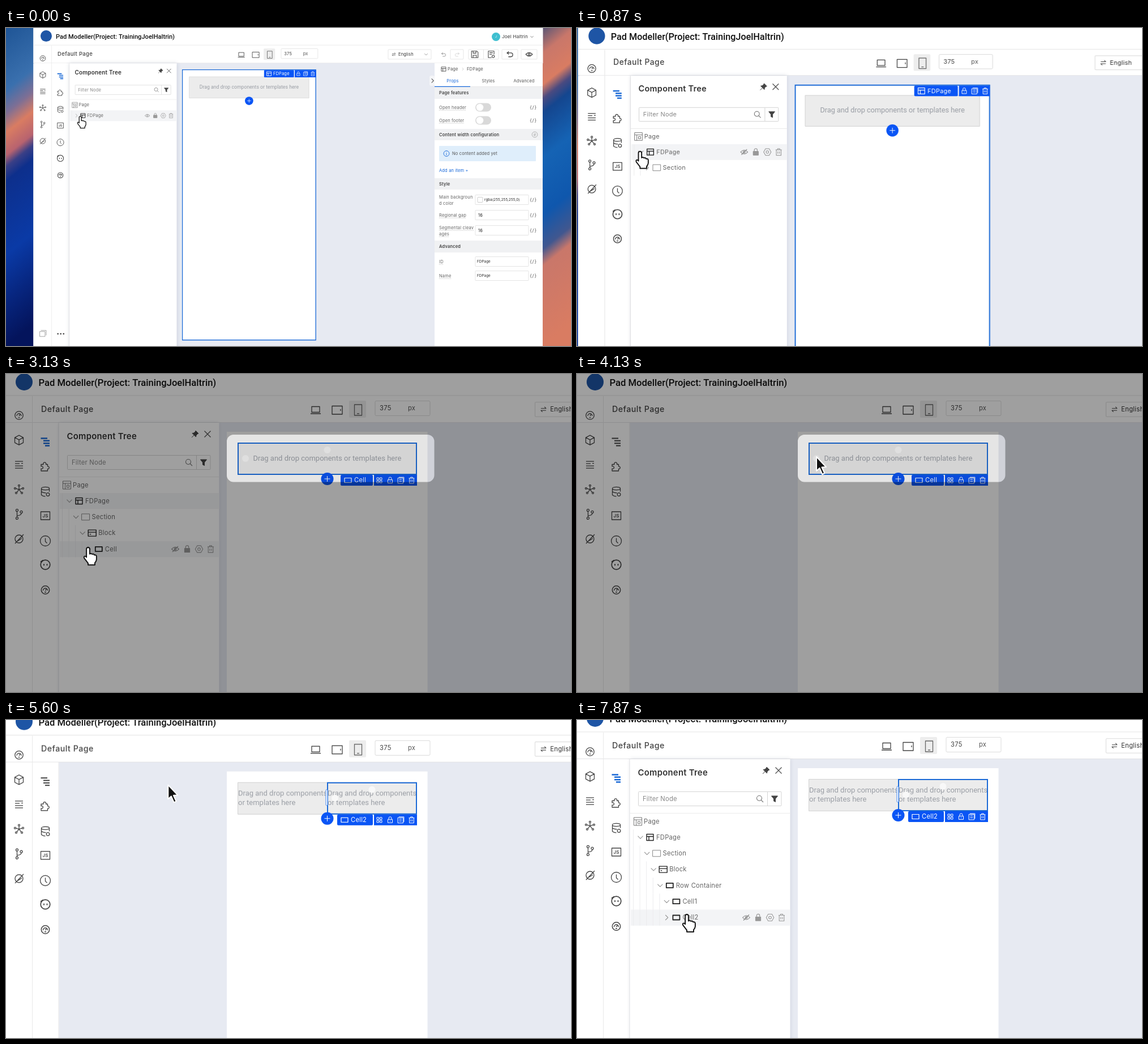
Animation of 998 by 561 pixels, one loop 7.94 s. Source, as an HTML page with a canvas:

```html
<!DOCTYPE html>
<html>
<head>
<meta charset="utf-8">
<style>
html, body { margin: 0; width: 100%; height: 100%; overflow: hidden; background: #fff; }
canvas { display: block; }
</style>
</head>
<body>
<canvas id="stage" width="998" height="561"></canvas>
<script>
const W = 998, H = 561, LOOP = 7940, ZOOM = 1.494;
const BLUE = '#0a55f5', FRAME = '#1b6ad6', INK = '#444', GREY = '#777';
const out = document.getElementById('stage').getContext('2d');
const buffer = document.createElement('canvas');
buffer.width = W;
buffer.height = H;
const g = buffer.getContext('2d');

const clamp = v => Math.max(0, Math.min(1, v));
const smooth = v => (v = clamp(v), v * v * (3 - 2 * v));
const spring = (ms, rate) => {
  const a = Math.max(0, ms) * rate / 1000;
  return 1 - (1 + a) * Math.exp(-a);
};

// Icons are drawn around their own centre.
const ring = (x, y, r) => `M${x + r} ${y}a${r} ${r} 0 1 0 ${-2 * r} 0a${r} ${r} 0 1 0 ${2 * r} 0`;
const ICONS = {
  gauge: ring(0, 0, 7.2) + 'M-4 1A4 4 0 0 1 4 1M0 1L2-1.5M-1.5 3.8H1.5',
  cube: 'M0-8.5L7.5-4.5V4.5L0 8.5L-7.5 4.5V-4.5ZM-7.5-4.5L0-.5L7.5-4.5M0-.5V8.5',
  list: 'M-7-6H7M-7-2H1M-7 2H7M-7 6H7M4-2.5H7',
  nodes: 'M0 0V-6M0 0L6-2M0 0L4 5M0 0L-4 5M0 0L-6-2' + ring(0, -7, 1.5) + ring(7, -2, 1.5) + ring(5, 6, 1.5) + ring(-5, 6, 1.5) + ring(-7, -2, 1.5),
  branch: ring(-3.5, -7, 2) + ring(4, -4, 2) + ring(-3.5, 7, 2) + 'M-3.5-5V5M4-2Q4 2-3.5 2.5',
  brush: ring(0, 0, 7) + 'M-7 8L8-8M-3 4L5-1',
  tree: 'M-7.5-6H4M-3-1.7H8M-3 2.7H8M0 7H8',
  puzzle: 'M-7-3.5H-3a2.5 2.5 0 1 1 4.5 0H4.5V0a2.3 2.3 0 1 1 0 4.5V8H-7V4a2.3 2.3 0 1 0 0-4Z',
  data: 'M-7-5.5a7 2.6 0 1 0 14 0a7 2.6 0 1 0-14 0V6q3 2.4 7 2.4M7-5.5V0M-7 0q3 2.5 8 2.2' + ring(4.5, 5, 2.8),
  script: 'M-8-7H8V7H-8Z',
  clock: ring(0, 0, 9) + 'M0-5V1L3 4',
  face: ring(0, 0, 8.3) + 'M-2.5-1.5V1.5M3-1.5V1.5M-8.5-5L-4-8',
  eye: 'M-6.5 0Q0-7 6.5 0Q0 7-6.5 0Z' + ring(0, 0, 1.8),
  slash: 'M-5 5L5-5',
  lock: 'M-4.5-1H4.5V5.5H-4.5ZM-2.7-1V-3.5a2.7 2.7 0 0 1 5.4 0V-1M0 1.5V3',
  lockBody: 'M-4.5-1H4.5V5.5H-4.5Z',
  hex: 'M-3.3-6H3.3L6.7 0L3.3 6H-3.3L-6.7 0Z' + ring(0, 0, 2.3),
  trash: 'M-5.5-4H5.5M-2-4V-6H2V-4M-4.3-4V6H4.3V-4M-1.5-1V3M1.5-1V3',
  copy: 'M-4-6H6V4M-6-4.5H4.5V6H-6ZM-3.5-1.5H2M-3.5 2H2',
  grid: 'M-5-5H-1V-1H-5ZM1-5H5V-1H1ZM-5 1H-1V5H-5ZM1 1H5V5H1Z',
  Page: 'M-7-7H7V7H-7ZM-7-3H7M-3-3V7M0 0H4V4H0Z',
  FDPage: 'M-6-5.5H6V5.5H-6ZM-6-1.5H6M-2-1.5V5.5',
  Section: 'M-7-5.5H7V5.5H-7Z',
  Block: 'M-7-5.5H7V5.5H-7ZM-7-1.5H7M-4.5 2H-2',
  Cell: 'M-6-4H6V4H-6Z',
  down: 'M-4.5-2.3L0 2.3L4.5-2.3',
  right: 'M-2.3-4.5L2.3 0L-2.3 4.5',
  pin: 'M1-6L6-1L4.5-.5L2 2L1.5 5L-5-1.5L-2-2L.5-4.5ZM-2 2L-6 6',
  close: 'M-5.5-5.5L5.5 5.5M5.5-5.5L-5.5 5.5',
  search: ring(-1, -1, 4.5) + 'M2.5 2.5L6 6',
  funnel: 'M-5.5-5H5.5L1.5 0V5.5L-1.5 4V0Z',
  laptop: 'M-7-6H7V4H-7ZM-9 6.5H9',
  tablet: 'M-9-7H9V7.5H-9ZM6-1.5V1.5',
  phone: 'M-6.5-9.5H6.5V9.5H-6.5ZM-2 6.5H2',
  swap: 'M-5-2H5L2-5M5 2H-5L-2 5',
  undo: 'M-2-6L-6-3L-2 0M-6-3H2a4 4 0 0 1 0 8H-3',
  redo: 'M2-6L6-3L2 0M6-3H-2a4 4 0 0 0 0 8H3',
  save: 'M-8-8H5L8-5V8H-8ZM-4-8V-3H3V-8M-4 8V2H4V8',
  note: 'M1 8H-7V-8H7V0M-4-4H4M-4 0H2' + ring(5, 5, 3),
  info: ring(0, 0, 7) + 'M0-1V4M0-4V-3',
  stack: 'M-5-8H9V5M-8-5H6V8H-8Z',
  plus: 'M-5 0H5M0-5V5',
  hand: 'M-3 3Q-3 0 0 0Q3 0 3 3V12Q5.5 10 7.5 12.5Q10 11 11.5 14Q15.5 13 15.5 17V22Q15 26 12.5 28V32H0V29Q-3 25-7 20Q-8.5 16-5.5 16Q-4.5 16-3 18Z',
  arrow: 'M0 0V25L5.5 20L10.3 31L14.3 29L9.5 18.5L17 18Z'
};
for (const k in ICONS) ICONS[k] = new Path2D(ICONS[k]);

function icon(name, x, y, color = INK, width = 1.3, scale = 1, fill) {
  g.save();
  g.translate(x, y);
  g.scale(scale, scale);
  g.lineWidth = width;
  g.lineJoin = 'round';
  if (fill) { g.fillStyle = fill; g.fill(ICONS[name]); }
  g.strokeStyle = color;
  g.stroke(ICONS[name]);
  g.restore();
}

function text(s, x, y, color = '#666', size = 11.2, weight = 400, gap = .25, font = 'Inter', align = 'left') {
  g.font = `${weight} ${size}px ${font}, sans-serif`;
  g.letterSpacing = gap + 'px';
  g.textAlign = align;
  g.textBaseline = 'middle';
  g.fillStyle = color;
  g.fillText(s, x, y + .4);
}
const small = (s, x, y, color = '#555', weight = 400, align) => text(s, x, y, color, 7.5, weight, .17, 'Inter', align);
const braces = y => text('{/}', 931.5, y, '#555', 8.2, 400, .8, 'Inter', 'center');

function rect(x, y, w, h, fill, stroke, r = 0, line = 1) {
  g.beginPath();
  g.roundRect(x, y, w, h, r);
  if (fill) { g.fillStyle = fill; g.fill(); }
  if (stroke) { g.strokeStyle = stroke; g.lineWidth = line; g.stroke(); }
}
const dot = (x, y, r, color) => rect(x - r, y - r, 2 * r, 2 * r, color, null, r);

// Slanted bands; the stops are heights on the left edge of the strip.
function wallpaper(x, slope, stops) {
  const d = H / (1 + slope * slope);
  const fill = g.createLinearGradient(x, 0, x - slope * d, d);
  stops.forEach(([y, c]) => fill.addColorStop(y / H, c));
  rect(x, 0, 50, H, fill);
}

function field(y, value, size = 7.5) {
  rect(829, y - 8.5, 94, 17, '#fff', '#d9d9d9', 1, .7);
  text(value, value[0] === 'r' ? 845 : value[0] === 'F' ? 832 : 834, y, '#222', size, 400, .15);
  braces(y);
}

function label(s, x, y, dashed = true) {
  small(s, x, y, '#666');
  if (!dashed) return;
  const w = g.measureText(s).width;
  g.setLineDash([1, 1]);
  g.lineWidth = .6;
  g.strokeStyle = '#888';
  g.beginPath();
  g.moveTo(x, y + 5);
  g.lineTo(x + w, y + 5);
  g.stroke();
  g.setLineDash([]);
}

function band(y, h, s) {
  rect(757, y, 191, h, '#f0f1f3');
  small(s, 765, y + h / 2, '#444', 600);
}

function propsPanel() {
  rect(757, 62, 191, 560, '#fff');
  rect(748, 84, 9, 18, '#f4f5f8', null, 3);
  icon('right', 753.5, 93, '#666', 1.4, .8);
  icon('FDPage', 773, 72.5, INK, 1.3, .67);
  small('Page', 780, 72.5);
  icon('right', 807, 72.5, '#aaa', 1.2, .5);
  small('FDPage', 814, 72.5);
  small('Props', 789, 93.5, '#1667d9', 400, 'center');
  small('Styles', 852, 93.5, '#555', 400, 'center');
  small('Advanced', 915, 93.5, '#555', 400, 'center');
  band(104, 21, 'Page features');
  rect(757, 103, 191, .8, '#e0e0e0');
  rect(757, 102.7, 63, 1.3, '#1667d9');
  [['Open header', 140], ['Open footer', 163]].forEach(([s, y]) => {
    label(s, 765, y);
    rect(829, y - 7.5, 28, 15, '#d9d9d9', null, 7.5);
    dot(837, y, 6.3, '#fff');
    braces(y);
  });
  band(178, 20, 'Content width configuration');
  icon('info', 934, 188, '#999', 1, .7);
  icon('swap', 934, 188, '#999', 1, .45);
  rect(765, 208, 171, 27, '#dfeefb', null, 1);
  icon('info', 778, 221.5, '#1667d9', 1.3, .7);
  small('No content added yet', 788, 221.5);
  small('Add an item +', 765, 251, '#1667d9');
  band(265, 20, 'Style');
  label('Main backgroun', 765, 298, false);
  label('d color', 765, 309, false);
  field(303, 'rgba(255,255,255,0)', 6.2);
  rect(833, 298.5, 9, 9, '#fff', '#bbb', 1, .7);
  label('Regional gap', 765, 330);
  field(330, '16');
  label('Segmental cleav', 765, 352);
  label('ages', 765, 363);
  field(357, '16');
  band(375, 21, 'Advanced');
  label('ID', 765, 412);
  field(412, 'FDPage', 6.2);
  label('Name', 765, 437);
  field(437, 'FDPage', 6.2);
}

function topRight() {
  dot(865.5, 15.5, 7.5, '#3fbfd0');
  text('J', 865.5, 15.5, '#fff', 5, 400, 0, 'Inter', 'center');
  text('Joel Haltrin', 876, 15.5, '#333', 8.1, 400, .2);
  icon('down', 929, 15.5, '#555', 1.3, .55);
  [[675, 76], [785, 23], [817, 53], [876, 28], [910, 28]].forEach(([x, w]) => rect(x, 38, w, 17, '#fff', '#dcdcdc', 1, .7));
  rect(843, 38, .7, 17, '#dcdcdc');
  icon('swap', 685, 46.5, INK, 1.2, .6);
  small('English', 693, 46.5, '#333');
  icon('down', 742, 46.5, '#777', 1.2, .6);
  icon('undo', 773, 47, '#777', 1.2, .6);
  icon('redo', 797, 47, '#ccc', 1.2, .6);
  icon('save', 828, 46.5, INK, 1.5, .72);
  icon('note', 857, 46.5, INK, 1.5, .72);
  icon('undo', 890, 46.5, INK, 1.5, .85);
  icon('eye', 924, 46.5, INK, 1.3, .9);
}

function sidebars(open) {
  rect(-2, 86, 95, 760, '#fff');
  rect(46, 39, 1, 800, '#e8e8e8');
  rect(92.5, 86, 1, 760, '#e8e8e8');
  ['gauge', 'cube', 'list', 'nodes', 'branch', 'brush'].forEach((n, i) => icon(n, 23, 73 + i * 43.6));
  icon('tree', 69, 119.5, open ? FRAME : INK, open ? 2.5 : 2);
  icon('puzzle', 69, 163);
  icon('data', 69.5, 207.5);
  icon('script', 69.5, 250);
  text('JS', 69.5, 250, INK, 8, 600, 0, 'Inter', 'center');
  icon('clock', 69.5, 294.5);
  icon('face', 69.5, 336.5, INK, 1.7);
  icon('gauge', 69.5, 381, INK, 1.5);
  icon('stack', 23, 798, '#888', 1.1);
  [63, 70.5, 78].forEach(x => dot(x, 799, 2, INK));
}

function toolbar() {
  rect(-2, -20, 1345, 58, '#fff');
  rect(-2, 38, 1345, 47.5, '#fff');
  rect(-2, 37.5, 1345, 1, '#e5e5e5');
  rect(-2, 85, 1345, 1, '#e3e3e6');
  dot(32, 14, 15, '#1e55a5');
  text('Pad Modeller(Project: TrainingJoelHaltrin)', 57.5, 16, '#111', 16.6, 500, 0, 'Roboto');
  text('Default Page', 62, 62, '#444', 14.2, 500, .5);
  rect(606, 47, 30, 30, '#ededed', null, 2);
  icon('laptop', 547, 63.5);
  icon('tablet', 585, 63.5);
  icon('phone', 622, 63.5, '#666');
  rect(652, 47.5, 97, 26, '#fff', '#dcdcdc', 2);
  text('375', 660, 60.5, '#444');
  text('px', 710, 60.5, '#555');
}

const TIMES = { section: 850, block: 1250, cell: 1900, pick: 2500, close: 3650, split: 4350, reopen: 5900 };
const selectedAt = t => t < TIMES.block ? 'FDPage' : t < TIMES.cell ? 'Section' :
  t < TIMES.pick ? 'Block' : t < TIMES.split ? 'Cell' : 'Cell2';

function rowsAt(t) {
  const names = ['FDPage'];
  if (t > TIMES.section) names.push('Section');
  if (t > TIMES.block) names.push('Block');
  if (t > TIMES.split) names.push('Row Container', 'Cell1', 'Cell2');
  else if (t > TIMES.cell) names.push('Cell');
  return names;
}

function treePanel(t, pointer) {
  g.save();
  g.shadowColor = 'rgba(60,70,100,.18)';
  g.shadowBlur = 7;
  rect(93.5, 86, 283, 760, '#fff');
  g.restore();
  text('Component Tree', 107.5, 110, '#333', 14.8, 600, .3);
  icon('pin', 334, 106, INK, 1, 1, INK);
  icon('close', 356, 106, '#555', 1.4);
  rect(108.5, 143.5, 252.5, 25, '#fff', '#d5d5d5', 1);
  rect(336, 143.5, 1, 25, '#d5d5d5');
  text('Filter Node', 116, 156, '#888');
  icon('search', 323, 156, GREY, 1.1);
  icon('funnel', 349, 156, INK, 1, 1, INK);
  rect(93.5, 181, 283, 1, '#ebebeb');
  icon('Page', 107.5, 196, GREY, 1);
  text('Page', 118, 196);

  const rows = rowsAt(t), selected = selectedAt(t), step = 28.3;
  const hover = pointer.x > 95 ? Math.round((pointer.y - 224) / step) : -1;
  rows.forEach((name, i) => {
    const y = 224 + i * step, level = Math.min(i, 4), x = level * 11.6;
    if (name === selected || name === 'FDPage' && t < TIMES.split) rect(95, y - 14, 281.5, step, '#f3f4f6');
    if (pointer.x > 95)
      for (let k = 0; k <= level; k++) rect(99 + k * 11.6, y - 14, 1, step, '#ececee');
    if (name === 'Block' && i === hover && rows.length === 3) rect(121.5, y - 14, 1.2, 26, '#4b8cf0');
    const opened = i < rows.length - 1;
    icon(opened ? 'down' : 'right', 112 + x, y, '#999', 1.1);
    const kind = ICONS[name] ? name : 'Cell';
    icon(kind, 129 + x, y, kind === 'Section' ? '#888' : '#222', kind === 'Cell' ? 1.8 : kind === 'Section' ? 1 : 1.4);
    text(name, 140 + x, y);
    if (i === hover) {
      icon('eye', 299, y, '#888', 1.1);
      if (t > 70) icon('slash', 299, y, '#888', 1.2);
      icon('lock', 320, y, '#999', 1.2);
      icon('lockBody', 320, y, '#999', 1, 1, '#999');
      icon('hex', 341, y, '#999', 1.1);
      icon('trash', 361.5, y, '#999', 1.1);
    }
  });
}

function tag(name, x, y, right, actions) {
  const start = right - actions.length * 19 + (actions.length === 3 ? 1 : 0);
  rect(x, y, start - 2 - x, 19, BLUE, null, 2);
  rect(start, y, right - start, 19, BLUE);
  icon(ICONS[name] ? name : 'Cell', x + 13, y + 9.5, '#fff', 1.2);
  text(name, x + 24, y + 9.5, '#fff', 11.2);
  actions.forEach((a, i) => icon(a, start + 9.5 + i * 19, y + 9.5, '#fff', 1.1, .9));
}

function drop(x, w, lines) {
  rect(x, 121.5, w, 56, '#ececec', '#d4d4d4');
  const put = (s, px, py, align) => text(s, px, py, '#9b9fa6', 13, 400, 0, 'Roboto', align);
  if (lines) {
    put('Drag and drop components', x + .5, 140.5);
    put('or templates here', x + .5, 157);
  } else put('Drag and drop components or templates here', 567.5, 148.5, 'center');
}

function page(t) {
  const selected = selectedAt(t), tools = ['lock', 'copy', 'trash'], split = t > TIMES.split;
  rect(390, 102, 354.5, 714, '#fff');
  if (split) { drop(409.5, 158, true); drop(567.5, 158, true); }
  else drop(409.5, 316);
  const frame = (x, y, w, h) => rect(x, y, w, h, null, FRAME, 0, 2);
  if (selected === 'FDPage') {
    frame(391.5, 103, 352, 712.5);
    tag('FDPage', 607, 104, 744, tools);
  } else if (selected === 'Section') {
    frame(391, 103, 352.5, 92);
    tag('Section', 609, 197, 744, tools);
  } else {
    const x = split ? 568 : 410;
    frame(x, 122, 725 - x, 55);
    dot(x + 13, 149, 6, '#f8f8f8');
    dot(x + (725 - x) / 2, 134, 6, '#f8f8f8');
    if (split) rect(565, 134, 3, 28, '#fff', '#4b8cf0', 1.5);
    tag(selected, split ? 585 : selected === 'Cell' ? 591 : 586, 178, 726, ['grid', ...tools]);
  }
  dot(567.5, 185, 11, BLUE);
  icon('plus', 567.5, 185, '#fff', 1);
}

function dim(t) {
  const level = smooth((t - 2500) / 600) * (1 - smooth((t - 4960) / 500));
  if (!level) return;
  g.beginPath();
  g.rect(-100, -100, 1500, 1000);
  g.roundRect(390, 107, 366.5, 83.5, 12);
  g.fillStyle = `rgba(0,0,0,${.375 * level})`;
  g.fill('evenodd');
  rect(390, 107, 366.5, 83.5, `rgba(0,0,0,${.1 * Math.min(1, 3 * level)})`, null, 12);
}

const PATH = [
  [0, 122, 226], [430, 110, 222], [850, 110, 222], [1050, 122, 250], [1300, 122, 250],
  [1570, 127, 268], [1800, 133, 280], [2000, 133, 280], [2400, 145, 306], [3200, 145, 306],
  [3750, 423, 146], [4350, 423, 146], [4900, 566, 140], [5300, 566, 140],
  [5850, 76, 115], [6450, 76, 115], [7350, 194, 360], [LOOP, 194, 360]
];
function pointerAt(t) {
  const i = PATH.findIndex(k => k[0] > t), a = PATH[i - 1], b = PATH[i];
  const p = smooth((t - a[0]) / (b[0] - a[0]));
  return { x: a[1] + (b[1] - a[1]) * p, y: a[2] + (b[2] - a[2]) * p };
}

function scene(t, camTime) {
  const p = spring(camTime - 84, 5.4), s = 1 + (ZOOM - 1) * p;
  const pan = 17 * spring(camTime - 5300, 7.5);
  const open = t < TIMES.close || t > TIMES.reopen, pointer = pointerAt(t);
  const world = () => g.setTransform(s, 0, 0, s, -74 * p, -7 * p - pan);
  // The workspace is laid out at full zoom and scaled back to the wide view.
  const near = () => { world(); g.scale(1 / ZOOM, 1 / ZOOM); g.translate(74, 7); };

  world();
  wallpaper(0, -.8, [[0, '#1f5596'], [110, '#3a70ae'], [150, '#7d6f95'], [185, '#d97c62'], [225, '#b8636f'], [245, '#3a3f86'], [270, '#0d2f8c'], [400, '#0a3aa6'], [480, '#072680'], [561, '#04145c']]);
  wallpaper(948, -.8, [[0, '#5b5675'], [45, '#c9776a'], [100, '#d97c62'], [125, '#4a4a80'], [150, '#14468f'], [230, '#1563b4'], [330, '#0f57ad'], [390, '#41578f'], [420, '#c9776a'], [561, '#d97c62']]);
  rect(50, -20, 898, 640, '#fff');
  rect(112, 62, 645, 560, '#e7eaf2');
  near();
  page(t);
  toolbar();
  sidebars(open);
  if (open) treePanel(t, pointer);
  world();
  topRight();
  propsPanel();
  near();
  dim(t);
  if (t < 3350 || t > 5800) icon('hand', pointer.x, pointer.y, '#111', 2, .96, '#fff');
  else icon('arrow', pointer.x, pointer.y, '#fff', 2, 1, '#111');
}

function render(t) {
  // Several camera samples per picture give the motion blur.
  const moving = t > 70 && t < 1300 || t > 5300 && t < 6000;
  const samples = moving ? 6 : 1;
  for (let i = 0; i < samples; i++) {
    scene(t, t + (moving ? (i - 2.5) * 4 : 0));
    out.globalAlpha = 1 / (i + 1);
    out.drawImage(buffer, 0, 0);
  }
}

const begin = performance.now();
function tick() {
  render((performance.now() - begin) % LOOP);
  requestAnimationFrame(tick);
}
tick();
</script>
</body>
</html>
```
